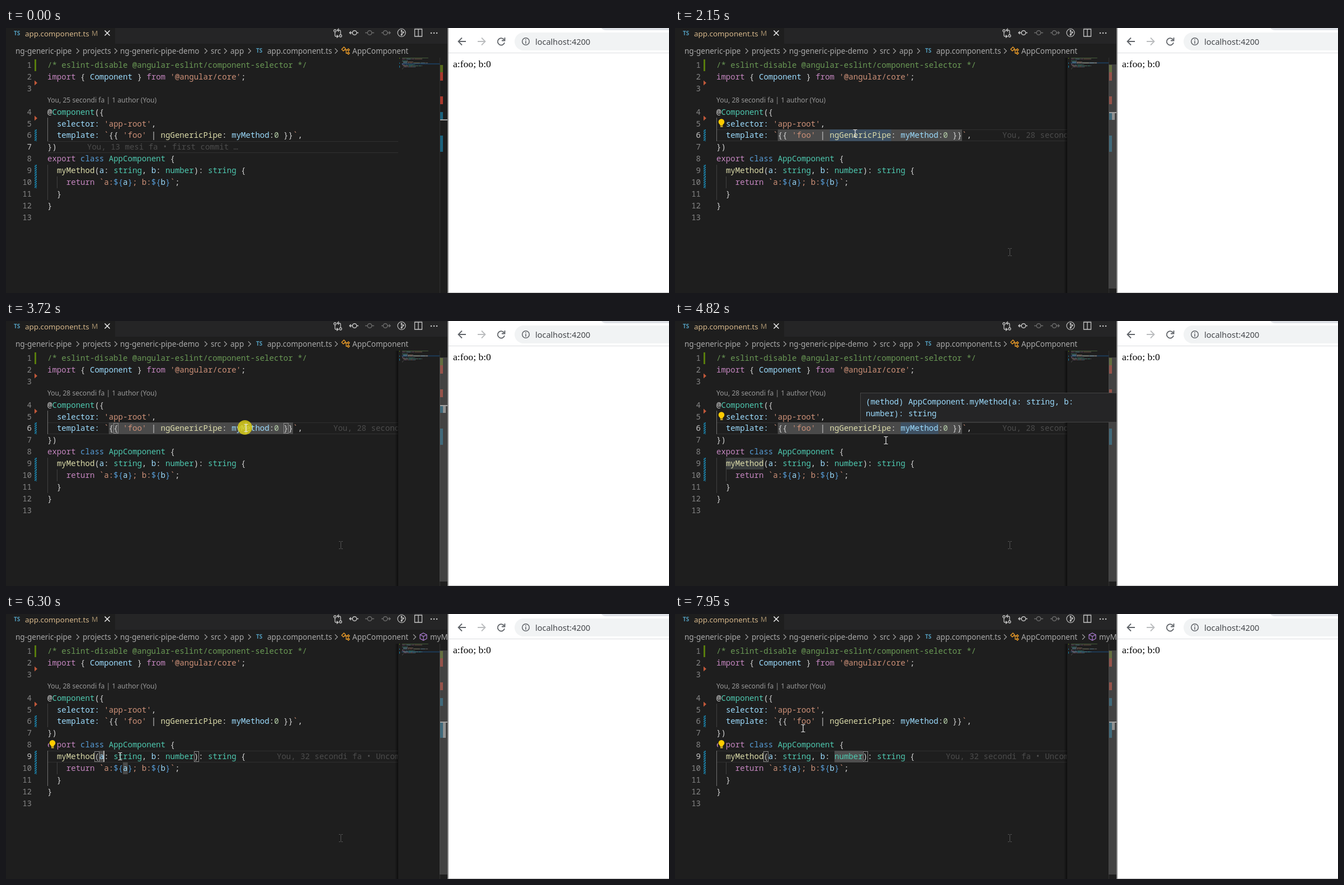
An HTML page with a canvas that plays this animation: 1185 px wide and 473 px high, repeating every 8 s.

```html
<!DOCTYPE html>
<html lang="it">
<head>
<meta charset="utf-8">
<style>
html, body { margin: 0; width: 100%; height: 100%; overflow: hidden; background: #1e1e1e; }
canvas { display: block; }
</style>
</head>
<body>
<canvas id="stage" width="1185" height="473"></canvas>
<script>
const LOOP = 8000, X0 = 74, CH = 8.442, ROW = 20.9;
const MONO = '14.07px "Noto Sans Mono", monospace';
const ui = size => `${size}px "Noto Sans", sans-serif`;
const c = document.getElementById('stage').getContext('2d');

const COLORS = { g: '#6a9955', m: '#c586c0', w: '#d4d4d4', v: '#9cdcfe', s: '#ce9178',
  t: '#4ec9b0', f: '#dcdcaa', k: '#569cd6', n: '#b5cea8' };
// "~x" switches to colour x.
const CODE = [
  '~g/* eslint-disable @angular-eslint/component-selector */',
  "~mimport ~w{ ~vComponent ~w} ~mfrom ~s'@angular/core'~w;",
  '',
  '~w@~tComponent~w({',
  "~w  ~vselector: ~s'app-root'~w,",
  "~w  ~vtemplate: ~s`~w{{ ~s'foo' ~w| ~fngGenericPipe~w: ~vmyMethod~w:~n0 ~w}}~s`~w,",
  '~w})',
  '~mexport ~kclass ~tAppComponent ~w{',
  '~w  ~fmyMethod~w(~va~w: ~tstring~w, ~vb~w: ~tnumber~w): ~tstring ~w{',
  '~w    ~mreturn ~s`a:~k${~va~k}~s; b:~k${~vb~k}~s`~w;',
  '~w  }',
  '~w}',
  ''
].map(line => {
  let col = 0;
  return line.split('~').slice(1).map(part => {
    const token = { color: COLORS[part[0]], text: part.slice(1), col };
    col += token.text.length;
    return token;
  });
});

// Pointer path: time, x, y
const PATH = [[390, 871, 455], [700, 598, 400], [1140, 334, 183], [1210, 328, 183], [1280, 322, 188],
  [2200, 322, 188], [2430, 418, 199], [2630, 422, 201], [3200, 428, 199], [3450, 429, 191],
  [4200, 429, 191], [4820, 377, 213], [5020, 305, 238], [5290, 150, 252], [5490, 150, 252],
  [5760, 171, 255], [6120, 171, 254], [6300, 204, 254], [6480, 219, 254], [6790, 219, 254],
  [7120, 311, 254], [7540, 311, 254], [7950, 229, 204]];
// Clicks: time, length, x, y, caret column, line
const CLICKS = [[1540, 110, 322, 188, 29.2, 6], [3650, 230, 427, 190, 42, 6],
  [6000, 180, 171, 254, 12, 9], [6540, 150, 219, 254, 17, 9], [7250, 150, 311, 254, 28, 9]];

const within = (t, a, b) => t >= a && t < b;
const colX = col => X0 + col * CH;
const mid = n => 66 + ROW * (n < 4 ? n - 1 : n);
const rowTop = n => Math.round(mid(n) - 10.4);

function rect(x, y, w, h, color) { c.fillStyle = color; c.fillRect(x, y, w, h); }
function text(s, x, y, color, font = MONO) {
  c.font = font; c.fillStyle = color; c.fillText(s, x, y);
}
function stroke(d, color, width = 1, x = 0, y = 0) {
  c.save(); c.translate(x, y);
  c.strokeStyle = color; c.lineWidth = width; c.stroke(new Path2D(d));
  c.restore();
}
function disc(x, y, r, color) {
  c.fillStyle = color; c.beginPath(); c.arc(x, y, r, 0, 7); c.fill();
}
function clip(x, y, w, h, paint) {
  c.save(); c.beginPath(); c.rect(x, y, w, h); c.clip(); paint(); c.restore();
}
const ring = (x, y, r) => `M${x - r},${y}a${r},${r} 0 1 0 ${2 * r},0a${r},${r} 0 1 0 ${-2 * r},0`;
const mark = (n, col, len, color) => rect(colX(col), rowTop(n), len * CH, 21, color);
const box = (n, col) => {
  c.strokeStyle = '#888'; c.lineWidth = 1;
  c.strokeRect(Math.round(colX(col)) + .5, rowTop(n) + 1.5, 8, 18);
};

function drawHeader(method) {
  rect(195, 0, 594, 28, '#252526');
  const ts = ['#519aba', 'bold 10px "Noto Sans", sans-serif'];
  text('TS', 14, 13, ...ts);
  text('app.component.ts', 34, 15, '#d6b78a', ui(13.4));
  text('M', 153, 14, '#a58f6c', ui(12.5));
  stroke('M-4.5,-4.5L4.5,4.5M4.5,-4.5L-4.5,4.5', '#f0f0f0', 1.5, 181, 9);

  const light = '#c5c5c5', dim = '#6b6b6b';
  stroke(ring(-5, -4, 2) + ring(5, 5, 2) + 'M-5,-2V4Q-5,6 -3,6H0M-2,3.5L1,6L-2,8.5M5,3V-3Q5,-5 3,-5H0M2,-8L-1,-5L2,-2.5', light, 1.3, 593, 9);
  stroke(ring(1, 0, 3.8) + 'M-3,0H-8M-5.5,-2.5L-8,0L-5.5,2.5M5,0H8', light, 1.4, 622, 8.5);
  stroke(ring(0, 0, 3.8) + 'M-8,0H-4M4,0H8', dim, 1.4, 650, 8.5);
  stroke(ring(-1, 0, 3.8) + 'M3,0H8M5.5,-2.5L8,0L5.5,2.5M-5,0H-8', dim, 1.4, 679, 8.5);
  stroke(ring(0, 0, 7) + 'M0,-5V5M0,3Q3,2 3,-1', light, 1.2, 707, 8.5);
  disc(707, 5, 1.6, light); disc(710, 7.5, 1.6, light); disc(707, 12, 1.6, light);
  stroke('M-6.5,-6.5H6.5V6.5H-6.5ZM0,-6.5V6.5', light, 1.3, 737, 8.5);
  [760, 765, 770].forEach(x => disc(x, 9, 1.3, light));

  const crumbs = [[17, 'ng-generic-pipe'], [137, 'projects'], [204, 'ng-generic-pipe-demo'],
    [366, 'src'], [401, 'app'], [467, 'app.component.ts'], [619, 'AppComponent']];
  const chevrons = [128, 196, 357, 392, 435, 590];
  if (method) { crumbs.push([758, 'myMethod']); chevrons.push(730); }
  crumbs.forEach(([x, s]) => text(s, x, 46, '#a9a9a9', ui(13.5)));
  chevrons.forEach(x => stroke('M-2,-4.5L2.5,0L-2,4.5', '#a0a0a0', 1.2, x, 41));
  text('TS', 447, 44, ...ts);
  stroke('M-7,-3L-3,-7L0,-4L-4,0ZM-2,-2H3M1,-2V4H3M3,-2L5,-4L7,-2L5,0ZM3,4L5,2L7,4L5,6Z', '#ee9d28', 1.3, 607, 41);
  if (method) stroke('M0,-6.5L6,-3.5V3.5L0,6.5L-6,3.5V-3.5ZM-6,-3.5L0,-.5L6,-3.5M0,-.5V6.5', '#b180d7', 1.2, 746, 40.5);
}

function drawGutter(active) {
  c.textAlign = 'right';
  for (let n = 1; n <= 13; n++) text(n, 46, mid(n) + 5, n === active ? '#c6c6c6' : '#858585');
  c.textAlign = 'left';
  rect(51, 56, 3, 21, '#587c0c');
  for (const n of [6, 9, 10]) clip(51, rowTop(n), 4, 21, () => {
    for (let y = 0; y < 30; y += 4) stroke('M0,4L4,0', '#1b81a8', 1.8, 51, rowTop(n) + y - 4);
  });
  for (const y of [98, 161]) {
    c.fillStyle = '#c0583a';
    c.fill(new Path2D(`M51,${y - 4.5}L56,${y}L51,${y + 4.5}Z`));
  }
}

function drawCode(t, active) {
  for (const y of [rowTop(active), rowTop(active) + 20]) rect(X0, y, 627, 1, '#303030');

  const grey = '#4a4a4a', hover = 'rgba(38,100,165,.28)';
  if (within(t, 2100, 6000)) mark(6, 13, 39, grey);
  if (within(t, 2000, 2700)) mark(6, 24, 13, hover);
  if (within(t, 2700, 3420) || within(t, 4500, 5150)) mark(6, 39, 8, hover);
  if (within(t, 4100, 6000)) mark(9, 2, 8, '#3a3d3e');
  if (within(t, 6150, 6540)) { mark(9, 11, 1, grey); mark(10, 16, 1, grey); }
  if (within(t, 6600, 7250)) mark(9, 14, 6, grey);
  if (t >= 7300) mark(9, 25, 6, '#4e4e4e');

  const guide = on => on ? '#707070' : '#404040';
  rect(74, 160, 1, 42, guide(active < 8));
  rect(74, 244, 1, 63, guide(active === 9));
  rect(91, 265, 1, 21, '#404040');

  CODE.forEach((line, i) => line.forEach(k => text(k.text, colX(k.col), mid(i + 1) + 5, k.color)));
  text(`You, ${t < 2100 ? 25 : 28} secondi fa | 1 author (You)`, X0, 133, '#999', ui(12.1));

  if (within(t, 1540, 2000) || within(t, 3450, 4200)) { box(6, 14); box(6, 50); }
  if (active === 9) { box(9, 10); box(9, 31); }

  const blame = '#4c4c4c';
  clip(X0, 53, 627, 420, () => {
    if (active === 7) text('You, 13 mesi fa • first commit …', 145, mid(7) + 5, blame);
    if (within(t, 2100, 6000)) text('You, 28 secondi fa • Uncommitted', 585, mid(6) + 5, blame);
    if (t >= 6200) text('You, 32 secondi fa • Uncommitted', 484, mid(9) + 5, blame);
  });
  if (within(t, 2150, 3300) || within(t, 4400, 6000)) drawBulb(mid(5));
  if (t >= 6200) drawBulb(mid(8));

  const click = CLICKS.find(k => within(t, k[0], k[0] + 500));
  if (click) rect(Math.round(colX(click[4])) - 1, rowTop(click[5]), 2, 20, '#aeafad');
}

function drawBulb(y) {
  rect(77, y - 10, 14, 19, '#1e1e1e');
  disc(83, y - 3, 5.3, '#ffcc00');
  rect(80.5, y, 5, 3.5, '#ffcc00');
  rect(81, y + 4, 4.5, 2.5, '#c8a830');
}

function drawSide(t, active) {
  if (t >= 2100) {
    const shade = c.createLinearGradient(695, 0, 701, 0);
    shade.addColorStop(0, 'rgba(0,0,0,0)');
    shade.addColorStop(1, 'rgba(0,0,0,.55)');
    rect(695, 53, 6, 420, shade);
  }
  const mapY = n => 53 + 1.76 * (n - 1);
  rect(707, mapY(active) - .5, 68, 2, '#1d3a56');
  if (within(t, 2100, 6000)) rect(718, mapY(6) - .5, 36, 2, '#555');
  c.globalAlpha = .5;
  CODE.forEach((line, i) => line.forEach(k => {
    const word = k.text.trim(), lead = k.text.length - k.text.trimStart().length;
    if (word) rect(708 + (k.col + lead) * .85, mapY(i + 1), word.length * .85, 1, k.color);
  }));
  c.globalAlpha = 1;
  rect(703, 53, 1, 2, '#587c0c');
  for (const n of [6, 9, 10]) rect(703, mapY(n), 1, 2, '#1b81a8');

  rect(775, 53, 1, 420, '#303031');
  const red = '#a8382c', blue = '#1a617c';
  [[66, 13, '#56691b'], [79, 15, red], [122, 14, red], [150, 14, blue], [192, 29, blue]]
    .forEach(([y, h, color]) => rect(776, y, 5, h, color));
  const hit = '#a0a0a0';
  if (within(t, 2100, 6000)) rect(781, 150, 5, 14, hit);
  if (t >= 6150) rect(781, 192, 5, t < 6540 ? 29 : 15, hit);
  if (t >= 700) rect(775, 65, 14, 400, 'rgba(121,121,121,.4)');
  rect(776, { 7: 163, 6: 150, 9: 192 }[active], 13, 2, '#a0a0a0');
}

function drawTooltip() {
  rect(331, 128, 470, 53, '#454545');
  rect(332, 129, 470, 51, '#252526');
  text('(method) AppComponent.myMethod(a: string, b:', 341, 149, COLORS.v);
  text('number): string', 341, 170, COLORS.v);
}

function drawBrowser() {
  rect(789, 0, 396, 473, '#fff');
  rect(789, 0, 2, 473, '#8b8b8b');
  rect(791, 44, 394, 1, '#dcdee1');
  rect(791, 472, 394, 1, '#bdbdbd');
  c.fillStyle = '#dee1e6';
  c.fill(new Path2D('M1064,0H1185V4H1073Q1067,4 1064,0Z'));
  c.fillStyle = '#f1f3f4';
  c.beginPath(); c.roundRect(909, 8, 300, 32, 16); c.fill();
  const ink = '#5f6368';
  stroke('M7,0H-6M0,-6.5L-6.5,0L0,6.5', ink, 1.8, 815, 24);
  stroke('M-7,0H6M0,-6.5L6.5,0L0,6.5', '#babcbe', 1.8, 850, 24);
  stroke('M5.2,-3A6.2,6.2 0 1 0 6,2M6.5,-7V-1.5H1', ink, 1.8, 885, 24);
  stroke(ring(0, 0, 6.3) + 'M0,-1V4M0,-4V-2.3', ink, 1.5, 929, 24);
  text('localhost:4200', 946, 29.5, '#44474b', ui(14.5));
  text('a:foo; b:0', 799, 70, '#000', '17.6px "Liberation Serif", serif');
}

const IBEAM = 'M-3.5,-6.5H-1L0,-5.5L1,-6.5H3.5M0,-5.5V5.5M-3.5,6.5H-1L0,5.5L1,6.5H3.5';

function drawPointer(t) {
  for (const [at, len, x, y] of CLICKS) {
    if (within(t, at, at + len)) disc(x, y, 13, 'rgba(225,212,22,.8)');
  }
  if (t >= 700) stroke(IBEAM, '#555', 1, 598.5, 400);
  if (t < PATH[0][0]) return;
  let i = PATH.findIndex(p => p[0] > t);
  if (i < 0) i = PATH.length - 1;
  const [t0, x0, y0] = PATH[i - 1], [t1, x1, y1] = PATH[i];
  const p = Math.min(1, (t - t0) / (t1 - t0)), e = p * p * (3 - 2 * p);
  const x = x0 + (x1 - x0) * e, y = y0 + (y1 - y0) * e;
  if (x < 790) return stroke(IBEAM, '#e8e8e8', 1.2, x, y);
  const arrow = new Path2D('M0,0V15L3.5,12L6,17.5L8.3,16.5L6,11H10.5Z');
  c.save(); c.translate(x, y);
  c.fillStyle = '#fff'; c.fill(arrow);
  c.strokeStyle = '#000'; c.lineWidth = 1; c.stroke(arrow);
  c.restore();
}

function draw(now) {
  const t = now % LOOP;
  const active = t < 1540 ? 7 : t < 6000 ? 6 : 9;
  rect(0, 0, 1185, 473, '#1e1e1e');
  drawHeader(t >= 6100);
  drawGutter(active);
  drawCode(t, active);
  drawSide(t, active);
  if (within(t, 2760, 3300) || within(t, 4600, 5020)) drawTooltip();
  drawBrowser();
  drawPointer(t);
}

const start = performance.now();
function tick() {
  draw(performance.now() - start);
  requestAnimationFrame(tick);
}
tick();
</script>
</body>
</html>
```
